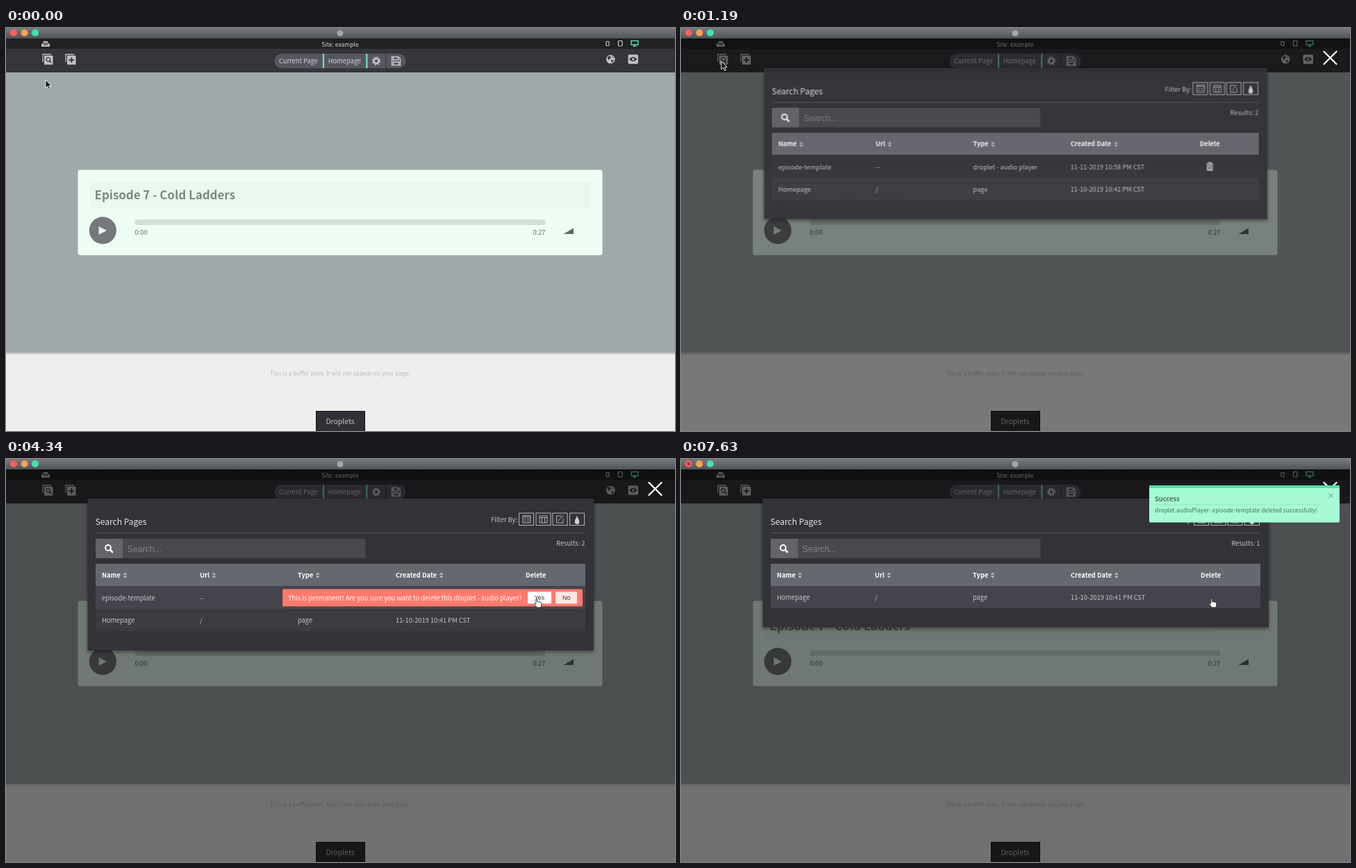
An HTML page for the animation above (7700 ms loop, 963x581 px).

```html
<!DOCTYPE html>
<html lang="en">
<head>
<meta charset="utf-8">
<title>Delete a droplet</title>
<style>
  html, body { margin: 0; width: 100%; height: 100%; overflow: hidden; background: #eee; }
  svg { display: block; width: 100%; height: 100%; }
  text { font: 9.32px "Noto Sans CJK JP", "Noto Sans CJK SC", "Noto Sans CJK", "Noto Sans", sans-serif; fill: #c6c6c8; }
  .mid { text-anchor: middle; }
  .bold { font-weight: bold; }
  .small { font-size: 8.4px; }
  .form { font-family: "Liberation Sans", Arial, sans-serif; }
  .line { fill: none; stroke: #b4b4b6; }

  /* One shared 7.7 s timeline */
  .t { animation: 7.7s linear infinite; }
  .cut { animation: 7.7s step-end infinite; }

  .dim { animation-name: dim; }
  .modal { animation-name: modal; transform-origin: 481.5px 167px; }
  .panel { animation-name: panel; }
  .before { animation-name: before; }
  .after { animation-name: after; }
  .rowHover { animation-name: rowHover; }
  .trash { animation-name: trash; }
  .confirm { animation-name: confirm; }
  .yes { animation-name: yes; }
  .lastHover { animation-name: lastHover; }
  .loader { animation-name: loader; }
  .toast { animation-name: toast; }
  .cursor { animation-name: cursor; }
  .arrow { animation-name: arrow; }
  .hand { animation-name: hand; }
  .drop { animation: bounce .77s ease-in-out infinite; }

  @keyframes dim {
    0%, 11.82% { opacity: 0; animation-timing-function: ease; }
    17.01%, 100% { opacity: 1; }
  }
  @keyframes modal {
    0%, 11.82% { opacity: 0; transform: scale(.9); animation-timing-function: ease; }
    17.01%, 100% { opacity: 1; transform: none; }
  }
  @keyframes panel { 0% { height: 219px; } 63.6%, 100% { height: 185.5px; } }
  @keyframes before { 0% { opacity: 1; } 63.6%, 100% { opacity: 0; } }
  @keyframes after { 0% { opacity: 0; } 63.6%, 100% { opacity: 1; } }
  @keyframes rowHover { 0% { opacity: 0; } 22.7%, 100% { opacity: 1; } }
  @keyframes trash { 0% { color: #bdbdbf; } 35%, 100% { color: #e8645c; } }
  @keyframes confirm { 0% { opacity: 0; } 44.5% { opacity: 1; } 63.6%, 100% { opacity: 0; } }
  @keyframes yes { 0% { fill: #ffe6e3; } 49%, 100% { fill: #fff; } }
  @keyframes lastHover { 0% { opacity: 0; } 69%, 100% { opacity: 1; } }
  @keyframes loader {
    0%, 60.9% { opacity: 0; }
    63%, 65% { opacity: .5; }
    66.36% { opacity: .16; }
    67%, 100% { opacity: 0; }
  }
  @keyframes bounce { 0%, 100% { transform: none; } 50% { transform: translateY(-12px); } }
  @keyframes toast {
    0%, 64.5% { opacity: 0; transform: translateX(38px); animation-timing-function: cubic-bezier(.33, 1, .68, 1); }
    69.1%, 100% { opacity: 1; transform: none; }
  }
  @keyframes cursor {
    0%, 5.5% { transform: translate(57px, 75px); animation-timing-function: ease-in-out; }
    10%, 16.5% { transform: translate(58px, 48px); animation-timing-function: ease-in; }
    21.82% { transform: translate(300px, 216px); animation-timing-function: ease-out; }
    33% { transform: translate(756px, 199px); }
    36.36%, 45% { transform: translate(759px, 199px); animation-timing-function: ease-in-out; }
    51%, 100% { transform: translate(764px, 201px); }
  }
  @keyframes arrow { 0% { opacity: 1; } 20.9% { opacity: 0; } 60.9% { opacity: 1; } 69%, 100% { opacity: 0; } }
  @keyframes hand { 0% { opacity: 0; } 20.9% { opacity: 1; } 60.9% { opacity: 0; } 69%, 100% { opacity: 1; } }
</style>
</head>
<body>
<svg viewBox="0 0 963 581" preserveAspectRatio="none">
  <defs>
    <linearGradient id="bar" x2="0" y2="1">
      <stop stop-color="#777a7c"/><stop offset="1" stop-color="#515456"/>
    </linearGradient>
    <linearGradient id="edge" x2="0" y2="1">
      <stop stop-color="#bcbebe"/><stop offset="1" stop-color="#eee"/>
    </linearGradient>
    <filter id="shadow" x="-5%" y="-10%" width="110%" height="125%">
      <feDropShadow dx="0" dy="2" stdDeviation="2.5" flood-opacity=".45"/>
    </filter>
    <path id="sort" d="M-3-.7L0-4 3-.7zM-3 .9L0 4.2 3 .9z" fill="#b9bac0"/>
    <path id="drip" d="M0-10C1-5 5-1 5 4A5 5.5 0 0 1-5 4C-5-1-1-5 0-10z"/>
    <rect id="box" width="21" height="17.5" class="line"/>
    <g id="stack">
      <path d="M-7 4V-7H5" fill="none" stroke="#b8b9bb" stroke-width="1.4"/>
      <rect x="-5" y="-5.3" width="12.5" height="13" rx="1" fill="#c3c4c6"/>
    </g>
  </defs>

  <!-- page -->
  <rect width="963" height="581" fill="#eee"/>
  <rect y="468" width="963" height="4" fill="url(#edge)"/>
  <rect y="64" width="963" height="404" fill="#a0a9a9"/>
  <rect x="103.5" y="204.5" width="755" height="123" rx="3.5" fill="#edfff4"/>
  <rect x="120" y="222" width="722" height="38" rx="2" fill="#e8faef"/>
  <text x="127.5" y="247" class="bold" style="font-size:16.9px;fill:#7b887f">Episode 7 - Cold Ladders</text>
  <circle cx="139.3" cy="291.8" r="19.6" fill="#76787b"/>
  <path d="M133.5 286v12l11.5-6z" fill="#e8f7ee"/>
  <rect x="185.5" y="276" width="591" height="8" rx="3.5" fill="#cfdfd5"/>
  <g font-weight="500">
    <text x="185.5" y="298" style="fill:#656c68">0:00</text>
    <text x="776.5" y="298" text-anchor="end" style="fill:#656c68">0:27</text>
  </g>
  <path d="M802.5 297L817 288.5V297z" fill="#626966"/>
  <text x="481" y="501" class="mid small" style="fill:#bcbcbc">This is a buffer zone. It will not appear on your page.</text>
  <rect x="446.5" y="552.5" width="70" height="30" fill="#303036" stroke="#151517"/>
  <text x="481" y="571.2" class="mid" style="font-size:10.45px">Droplets</text>

  <!-- toolbar -->
  <rect y="15" width="963" height="15" fill="#202223"/>
  <rect y="30" width="963" height="34" fill="#343439"/>
  <text x="481" y="27" class="mid" style="font-size:8.5px;fill:#d4d4d4">Site: example</text>
  <path d="M51 22.5h12V27H51zM53 21.5l1-2.5h6l1 2.5z" fill="#b9babc"/>
  <path d="M54 24h6" stroke="#333" />
  <g fill="none" stroke="#c4c5c6" stroke-width="1.2">
    <rect x="864" y="19.5" width="4" height="6" rx=".8"/>
    <rect x="881.5" y="18.5" width="5.5" height="7.5" rx=".8"/>
    <path d="M900 18.5h10v5.5h-10zM905 24v2M902.5 26.3h5" stroke="#5fd9b2" stroke-width="1.4"/>
  </g>
  <g transform="translate(60 45)">
    <use href="#stack"/>
    <circle cx=".8" cy=".4" r="2.8" fill="none" stroke="#38383d" stroke-width="1.4"/>
    <path d="M2.8 2.6L5.3 5.3" stroke="#38383d" stroke-width="1.6"/>
  </g>
  <g transform="translate(93 45)">
    <use href="#stack"/>
    <path d="M1.3-2.7v7.8M-2.6 1.2h7.8" stroke="#38383d" stroke-width="1.9"/>
  </g>
  <rect x="386.5" y="37" width="189" height="21" rx="10.5" fill="#55565f"/>
  <path d="M547 37v21" stroke="#43434a" stroke-width="1.5"/>
  <path d="M457 37v21M519.3 37v21" stroke="#72dcb9" stroke-width="2.3"/>
  <text x="393" y="51" style="fill:#d3d3d5">Current Page</text>
  <text x="463.7" y="51" style="fill:#d3d3d5">Homepage</text>
  <g transform="translate(533 47.5)" fill="none" stroke="#c3c4c8">
    <circle r="3.5" stroke-width="2.4"/>
    <circle r="5.2" stroke-width="2" stroke-dasharray="2.04 2.04"/>
  </g>
  <path d="M555.5 41.5h9l3 3v9h-12zM557.5 42v4h7v-4M557.5 53v-4h8v4" fill="none" stroke="#c6c7cb" stroke-width="1.5"/>
  <circle cx="870.3" cy="45" r="6.3" fill="#c3c4c6"/>
  <path d="M866 41l4-1 1 3-3 3-2-1zM871 46l4 0-2 4-2-1zM873 40l2 3-2 0z" fill="#4a4a4f"/>
  <rect x="895.5" y="38.3" width="14.5" height="13.5" rx="2" fill="#bfc0c2"/>
  <path d="M897 45q5.7-6.5 11.4 0q-5.7 6.5-11.4 0z" fill="#343439"/>
  <circle cx="902.7" cy="45" r="1.8" fill="#c3c4c6"/>

  <!-- dimmer and close button -->
  <g class="t dim">
    <rect y="15" width="963" height="566" fill="#000" fill-opacity=".53"/>
    <path d="M925.5 34l18 18M943.5 34l-18 18" stroke="#fff" stroke-width="2.4" stroke-linecap="round"/>
  </g>

  <!-- window bar -->
  <rect width="963" height="15" fill="url(#bar)"/>
  <circle cx="11" cy="7" r="5" fill="#fb5f62"/>
  <circle cx="26.5" cy="7" r="5" fill="#fca052"/>
  <circle cx="42" cy="7" r="5" fill="#41e3b6"/>
  <circle cx="11" cy="7" r="2" fill="#8e2c30" class="cut after"/>
  <circle cx="481" cy="7.5" r="4.5" fill="#a3a6a8"/>

  <!-- search dialog -->
  <g class="t modal">
    <rect x="117.5" y="57" width="728.5" height="219" fill="#333338" filter="url(#shadow)" class="cut panel"/>
    <text x="128.7" y="94.8" style="font-size:12px;fill:#e4e4e6">Search Pages</text>
    <path d="M129 106.8h705" stroke="#56565b"/>
    <text x="736" y="91" text-anchor="end">Filter By:</text>
    <use href="#box" x="738.5" y="78"/>
    <use href="#box" x="763" y="78"/>
    <use href="#box" x="787" y="78"/>
    <use href="#box" x="811.5" y="78"/>
    <g class="line">
      <path d="M744 81.5h11v10.5h-11zM744 83.5h11M746 86.5h2.5M750 86.5h3.5M746 89.3h2.5M750 89.3h3.5"/>
      <path d="M768 82h11v10h-11zM768 84.5h11M771.5 84.5v7.5M775.5 84.5v7.5"/>
      <path d="M802 86v6h-9.5V82h7M795.5 89.5l1-2.5 6-5.5"/>
    </g>
    <use href="#drip" transform="translate(822 88) scale(.65)" fill="#d0d0d2"/>
    <g class="cut before"><text x="833.5" y="125.2" text-anchor="end">Results: 2</text></g>
    <g class="cut after"><text x="833.5" y="125.2" text-anchor="end">Results: 1</text></g>

    <rect x="129" y="115" width="388.5" height="28" fill="#48484d"/>
    <rect x="129" y="115" width="39" height="28" fill="#636369"/>
    <g fill="none" stroke="#fff" stroke-width="2">
      <circle cx="147" cy="128" r="3.9"/><path d="M150 131l3.8 3.8" stroke-width="2.5"/>
    </g>
    <text x="174.6" y="133.7" class="form" style="font-size:12.3px;fill:#828287">Search...</text>

    <rect x="129" y="151" width="705" height="32" fill="#666870"/>
    <g class="bold">
      <text x="138" y="170.8" class="bold" style="fill:#fff">Name</text>
      <text x="279" y="170.8" class="bold" style="fill:#fff">Url</text>
      <text x="420" y="170.8" class="bold" style="fill:#fff">Type</text>
      <text x="561" y="170.8" class="bold" style="fill:#fff">Created Date</text>
      <text x="748" y="170.8" class="bold" style="fill:#fff">Delete</text>
    </g>
    <use href="#sort" x="171.3" y="167.5"/>
    <use href="#sort" x="299.3" y="167.5"/>
    <use href="#sort" x="448.7" y="167.5"/>
    <use href="#sort" x="626.7" y="167.5"/>

    <g class="cut before">
      <rect x="129" y="183" width="705" height="33.5" fill="#35353a"/>
      <rect x="129" y="183" width="705" height="33.5" fill="#45444d" class="cut rowHover"/>
      <rect x="129" y="216.5" width="705" height="32" fill="#3b3c40"/>
      <text x="138" y="203.7">episode-template</text>
      <text x="279" y="203.7">--</text>
      <text x="420" y="203.7">droplet - audio player</text>
      <text x="561" y="203.7">11-11-2019 10:58 PM CST</text>
      <g class="cut trash">
        <path d="M757.5 196h10.5M761 195.5v-1.5h3.5v1.5" fill="none" stroke="currentColor" stroke-width="1.5"/>
        <path d="M758.5 197.5h8.7v8.5h-8.7z" fill="currentColor"/>
        <path d="M761 198.8v5.6M763 198.8v5.6M765 198.8v5.6" stroke="#45444a" stroke-width=".8"/>
      </g>
      <text x="138" y="236.4">Homepage</text>
      <text x="279" y="236.4">/</text>
      <text x="420" y="236.4">page</text>
      <text x="561" y="236.4">11-10-2019 10:41 PM CST</text>
    </g>

    <g class="cut after">
      <rect x="129" y="183" width="705" height="32" fill="#45444d" class="cut lastHover"/>
      <text x="138" y="202.8">Homepage</text>
      <text x="279" y="202.8">/</text>
      <text x="420" y="202.8">page</text>
      <text x="561" y="202.8">11-10-2019 10:41 PM CST</text>
    </g>

    <g class="cut confirm">
      <rect x="398" y="187.5" width="432" height="25" rx="1.5" fill="#ff796d"/>
      <text x="406" y="203.7" style="fill:#fff">This is permanent! Are you sure you want to delete this droplet - audio player?</text>
      <rect x="751" y="191.5" width="34" height="17" rx="1" class="cut yes"/>
      <rect x="791" y="191.5" width="31" height="17" rx="1" fill="#ffe6e3"/>
      <text x="768" y="203.3" class="mid form" style="font-size:8.8px;fill:#333">Yes</text>
      <text x="806.7" y="203.3" class="mid form" style="font-size:8.8px;fill:#333">No</text>
    </g>
  </g>

  <g class="t loader" fill="#d5d7dc">
    <g class="drop" style="animation-delay:-280ms"><use href="#drip" x="461" y="189"/></g>
    <g class="drop" style="animation-delay:-665ms"><use href="#drip" x="481" y="189"/></g>
    <g class="drop" style="animation-delay:-88ms"><use href="#drip" x="501" y="189"/></g>
  </g>

  <!-- success message -->
  <g class="t toast">
    <rect x="674" y="38" width="274" height="53.5" rx="2" fill="#a6fbd4"/>
    <path d="M674 42v-2q0-2 2-2h270q2 0 2 2v2z" fill="#4ee3a6"/>
    <text x="682" y="60.5" class="bold" style="fill:#47705f">Success</text>
    <path d="M682 66h238" stroke="#93e6c0"/>
    <text x="682" y="77.4" class="small" style="fill:#47705f">droplet.audioPlayer: episode-template deleted successfully!</text>
    <path d="M932 49.5l7 7M939 49.5l-7 7" stroke="#5f9c84"/>
  </g>

  <!-- pointer -->
  <g class="t cursor">
    <path class="cut arrow" d="M0 0V11.5L2.7 9 4.7 13.5 6.7 12.6 4.7 8.3H8.3z" fill="#111" stroke="#fff" stroke-width=".9"/>
    <path class="cut hand" d="M-1.2 7.5V1q1-1.6 2 0v4q1.1-.9 2 .2q1.2-.7 2 .4q1.5-.4 2 1v3.4q-.3 1.5-1 3h-5.8L-3.2 8.5q-.2-2 2-1z" fill="#fff" stroke="#222" stroke-width=".9" stroke-linejoin="round"/>
  </g>
</svg>
</body>
</html>
```
